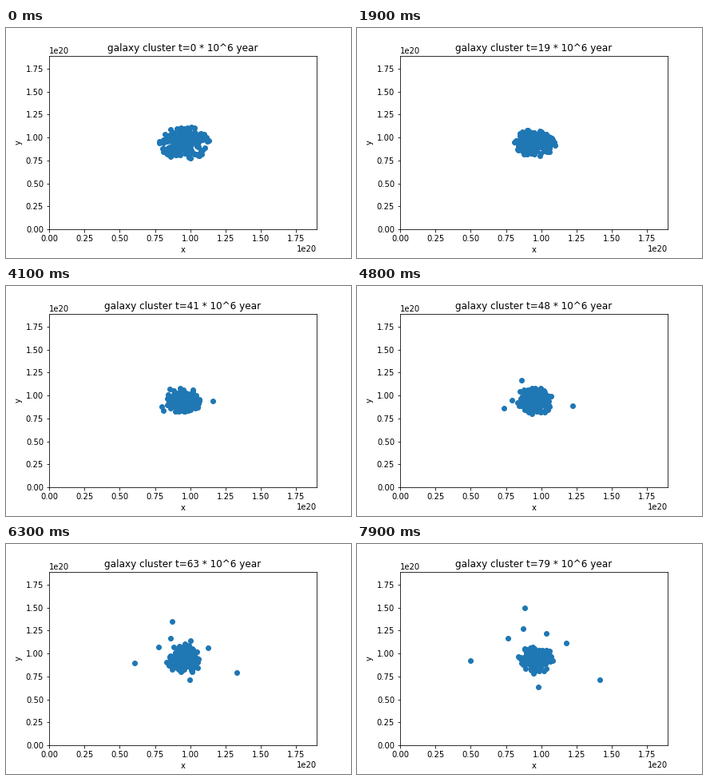
Animation, 432 px wide and 288 px high, one loop 8 s. Source, as a matplotlib script:

```python
import numpy as np
import matplotlib.pyplot as plt
from matplotlib.animation import FuncAnimation

FRAMES = 80
STARS = 220
SIZE = 1.8935e20                         # width of the simulated box, in metres
LEFT, BOTTOM, WIDE, HIGH = 54, 252, 334.8, 217.44   # axes box in pixels
CENTRE = np.array([222.5, 143.8])
LAUNCH = 29                              # when the escaping stars leave the core

# Start and end pixel of each escaping star
ESCAPES = np.array([
    [(222, 160), (142, 146)],
    [(239, 132), (304, 170)],
    [(242, 140), (227, 179)],
    [(203, 152), (210, 80)],
    [(200, 156), (208, 106)],
    [(198, 166), (189, 118)],
    [(225, 150), (262, 124)],
    [(212, 150), (237, 112)],
])
COUNT = len(ESCAPES)

plt.rcParams["text.kerning_factor"] = 6
rng = np.random.default_rng(4)


def unit(v):
    return v / np.linalg.norm(v, axis=1, keepdims=True)


axis_a = unit(rng.normal(size=(STARS, 3)))
axis_b = unit(np.cross(axis_a, rng.normal(size=(STARS, 3))))
depth = rng.random(STARS)
spin = rng.uniform(.04, .09, STARS)


def orbit(t):
    """Stars on tilted circles in a cluster that collapses and gets denser."""
    angle = (spin * t)[:, None]
    heading = (axis_a * np.cos(angle) + axis_b * np.sin(angle))[:, :2]
    radius_x = 23 + 9 * np.exp(-(t / 22) ** 2)
    radius_y = 18.5 + 3 * np.cos(np.pi * t / 35) * np.exp(-t / 80)
    reach = depth ** (.33 + .6 * t / FRAMES)
    return CENTRE + heading * reach[:, None] * (radius_x, radius_y)


def escape(t):
    """Straight outward paths, slowed by gravity."""
    u = max(0, (t - LAUNCH) / (FRAMES - 1 - LAUNCH))
    start, end = ESCAPES[:, 0], ESCAPES[:, 1]
    return start + (end - start) * u * (1.4 - .4 * u)


def positions(t):
    pos = orbit(t)
    s = np.clip(t / LAUNCH * 2 - 1, 0, 1)
    blend = s * s * (3 - 2 * s)
    pos[:COUNT] += (escape(t) - pos[:COUNT]) * blend
    return pos


def to_data(p):
    return np.column_stack([(p[:, 0] - LEFT) / WIDE,
                            (BOTTOM - p[:, 1]) / HIGH]) * SIZE


fig, ax = plt.subplots(figsize=(6, 4), dpi=72)
fig.subplots_adjust(left=.125, right=.9, bottom=.125, top=.88)
stars = ax.scatter(np.zeros(STARS), np.zeros(STARS))
ax.set(xlim=(0, SIZE), ylim=(0, SIZE), xlabel="x", ylabel="y")


def update(t):
    stars.set_offsets(to_data(positions(t)))
    ax.set_title(f"galaxy cluster t={t} * 10^6 year")


anim = FuncAnimation(fig, update, frames=FRAMES, interval=100,
                     repeat=True, repeat_delay=0)
plt.show()
```
